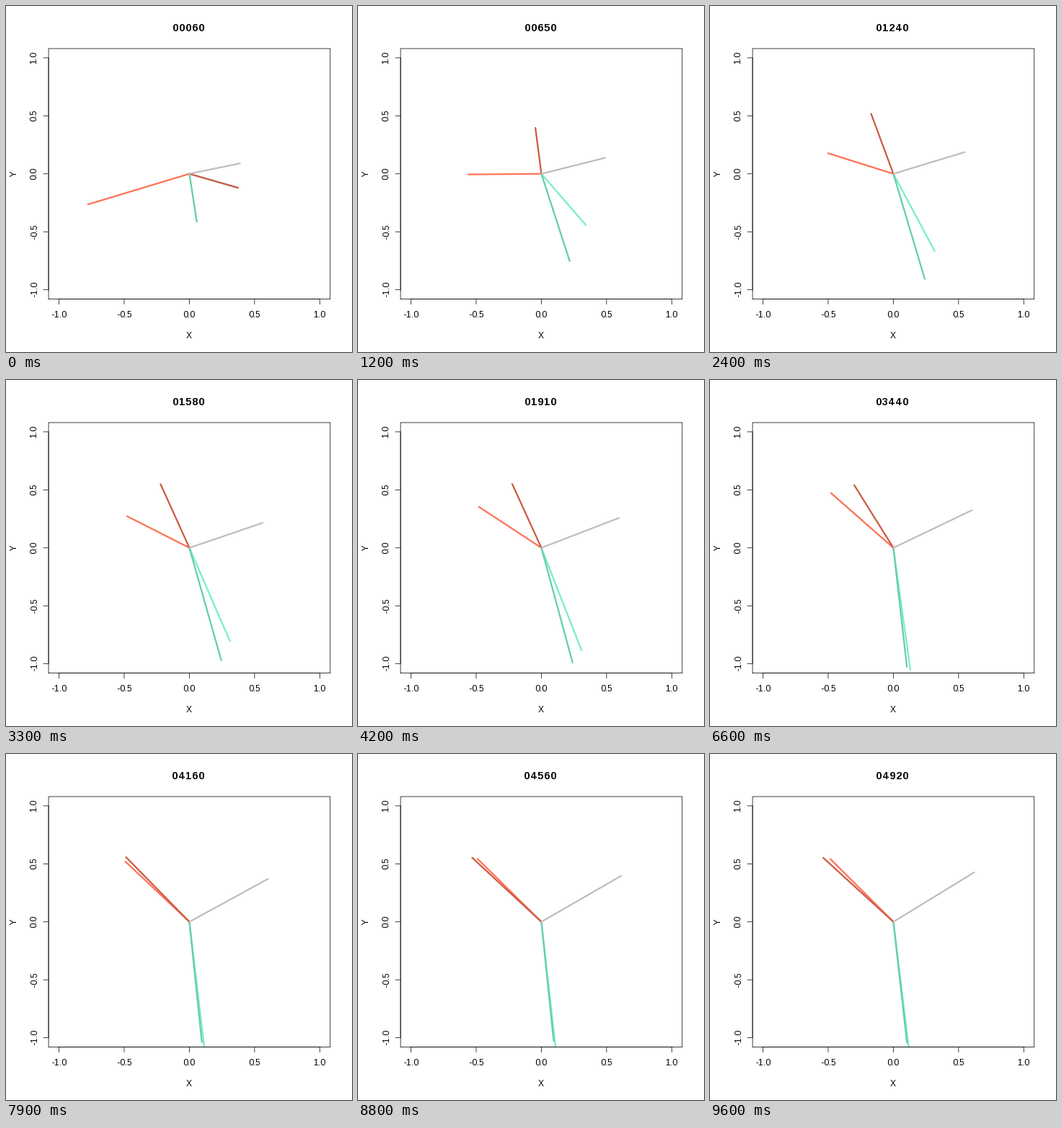
Write a matplotlib script that moves like this. It is 480 by 480 pixels and loops after 9700 ms.

```python
import numpy as np
import matplotlib.pyplot as plt
from matplotlib.animation import FuncAnimation
from matplotlib.lines import Line2D

SIZE, DPI = 480, 96
PT = 72 / DPI                      # points per pixel
FRAMES, STEP_MS = 97, 100
LEFT, RIGHT, TOP, BOTTOM = 59.04, 449.76, 59.04, 406.56
LIMIT = 1.08

plt.rcParams["font.family"] = "Liberation Sans"
plt.rcParams["text.hinting_factor"] = 1     # whole-pixel letter spacing

t = np.arange(FRAMES)
rng = np.random.default_rng(7)


def curve(start, jump, tau, shift=0, mid=0):
    """Settle exponentially by jump, then slide by shift around time mid."""
    jitter = np.zeros(FRAMES)
    for i in t[1:]:
        jitter[i] = .8 * jitter[i - 1] + rng.normal(0, .004)
    slide = shift / (1 + np.exp((mid - t) / 5))
    return start + jump * (1 - np.exp(-t / tau)) + slide + jitter


# Colour, x and y of each moving tip, in drawing order.
TIPS = [
    ("#76EEC6", curve(.372, -.045, 10, -.21, 54), curve(-.12, -1.08, 34)),
    ("#66CDAA", curve(.057, .205, 9, -.165, 53), curve(-.414, -.62, 15)),
    ("#FF7256", curve(-.778, .30, 9), curve(-.264, .864, 33)),
    ("#CD5B45", curve(.374, -.60, 10, -.32, 72), curve(-.121, .67, 8)),
    ("#BEBEBE", curve(.388, .227, 20), curve(.09, 1.2, 300)),
]

counter = np.interp(t, [0, 24, 42, 54, 66, 79, 96],
                    [60, 1240, 1910, 2630, 3440, 4160, 4920])
counter = np.round(counter / 10).astype(int) * 10

fig = plt.figure(figsize=(SIZE / DPI, SIZE / DPI), dpi=DPI, facecolor="white")
ax = fig.add_axes([LEFT / SIZE, 1 - BOTTOM / SIZE,
                   (RIGHT - LEFT) / SIZE, (BOTTOM - TOP) / SIZE])
ax.set_xlim(-LIMIT, LIMIT)
ax.set_ylim(-LIMIT, LIMIT)
ax.set_axis_off()


def px(v):
    return LEFT + (v + LIMIT) / (2 * LIMIT) * (RIGHT - LEFT)


def py(v):
    return BOTTOM - (v + LIMIT) / (2 * LIMIT) * (BOTTOM - TOP)


def stroke(xs, ys):
    """Thin unsnapped line through pixel points, measured from the top left."""
    line = Line2D(np.array(xs) / SIZE, 1 - np.array(ys) / SIZE,
                  transform=fig.transFigure, color="black", lw=.75 * PT,
                  solid_capstyle="round")
    line.set_snap(False)
    fig.add_artist(line)


def label(x, y, text, size=12, **kw):
    """Text placed by its centre and baseline, in pixels from the top left."""
    return fig.text(x / SIZE, 1 - y / SIZE, text, fontsize=size * PT, ha="center",
                    va="baseline", rotation_mode="anchor", **kw)


stroke([LEFT, RIGHT, RIGHT, LEFT, LEFT], [BOTTOM, BOTTOM, TOP, TOP, BOTTOM])
stroke([px(-1), px(1)], [BOTTOM, BOTTOM])
stroke([LEFT, LEFT], [py(-1), py(1)])
for v in np.linspace(-1, 1, 5):
    stroke([px(v), px(v)], [BOTTOM, BOTTOM + 7.2])
    stroke([LEFT - 7.2, LEFT], [py(v), py(v)])
    label(px(v) - .4, 432, f"{v:.1f}")
    label(42.5, py(v) - .7, f"{v:.1f}", rotation=90)
label(254, 461, "X")
label(14, 233, "Y", rotation=90)
title = label(253.5, 35, "", 14.4, weight="bold")

lines = [ax.plot([], [], color=c, lw=2.25 * PT, solid_capstyle="round")[0]
         for c, _, _ in TIPS]


def draw(i):
    title.set_text(f"{counter[i]:05d}")
    for line, (_, x, y) in zip(lines, TIPS):
        line.set_data([0, x[i]], [0, y[i]])
    return [title, *lines]


anim = FuncAnimation(fig, draw, frames=FRAMES, interval=STEP_MS,
                     repeat=True, repeat_delay=0)
plt.show()
```
